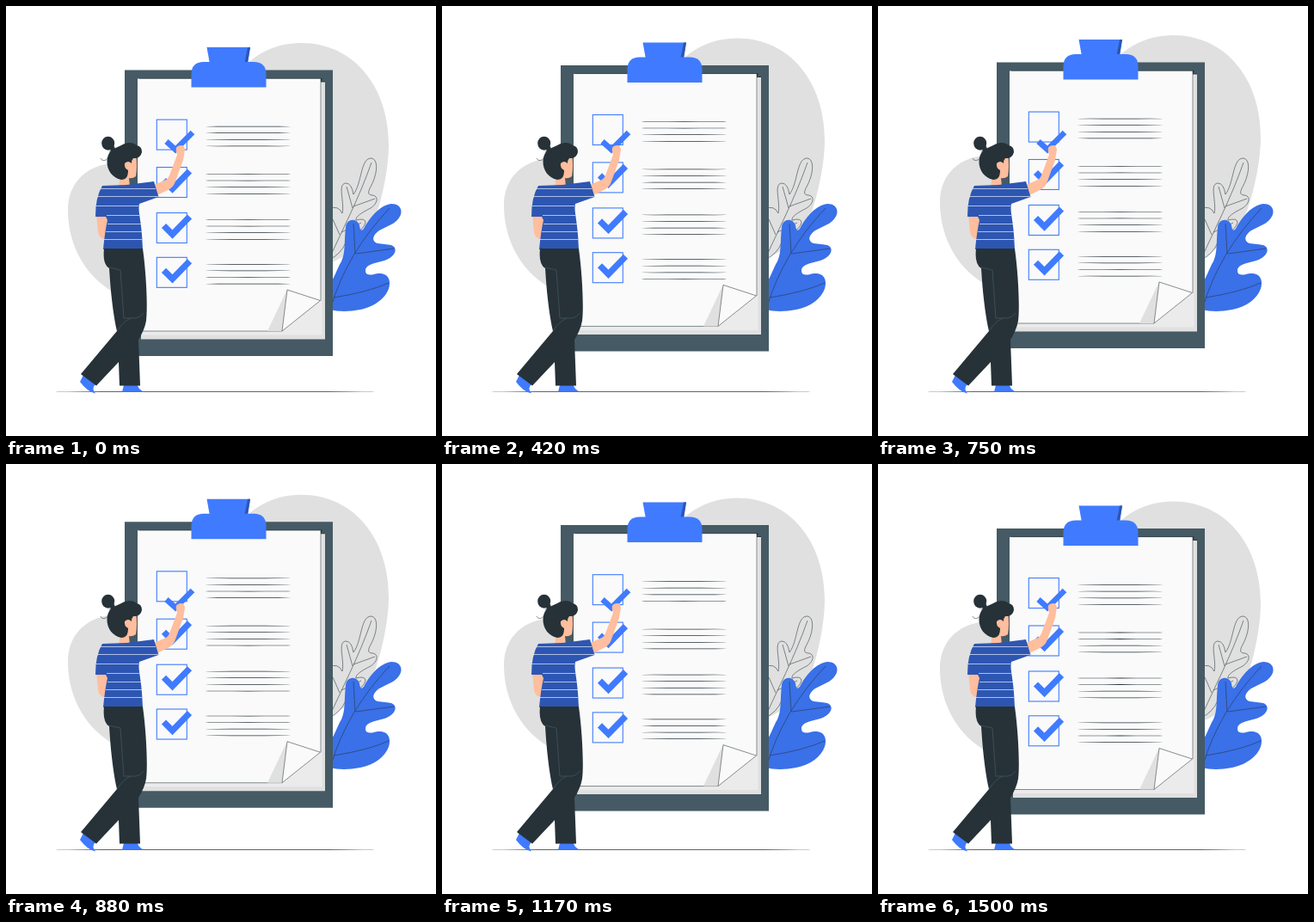
An HTML page that plays this animation: 500x500 px, repeating every 1.54 s.

```html
<!DOCTYPE html>
<html lang="en">
<head>
<meta charset="utf-8">
<title>Checklist</title>
<style>
  html, body { margin: 0; width: 100%; height: 100%; overflow: hidden; background: #fff; }
  svg { display: block; width: 100%; height: 100%; }
  .dark { fill: #263238; }
  .blue { fill: #407bff; }
  .skin { fill: #ffbe9d; }
  .thin { fill: none; stroke: #263238; stroke-width: .55; }
  .check { fill: none; stroke: #407bff; stroke-width: 7.3; }
</style>
</head>
<body>
<svg viewBox="0 0 500 500">
  <defs>
    <path id="tick" class="check" d="M9 15 19 25 39 4.500"/>
  </defs>

  <g class="float" fill="#e0e0e0">
    <path d="M270 80C285 58 312 43.500 343 43.500C405 43.500 445 95 445 162C445 188 438 222 430 245C418 275 398 292 375 300V80Z"/>
    <path d="M145 184C100 178 72 202 72 238C72 280 94 318 130 336L150 330V184Z"/>
  </g>

  <g id="plants">
    <path class="thin" style="fill:#e0e0e0" d="M376 236Q386 231 391 241C394 228 385 207 395 206Q402 206 404 219C414 206 412 178 424 177C434 177 432 197 423 212Q419 220 426 220C434 221 432 230 424 235C414 240 406 245 407 249Q418 246 418 252C415 263 402 264 395 275Q390 288 376 295Z"/>
    <path class="thin" d="M376 294C390 262 410 225 425 182M403 235 396 210M404 233 429 224M388 266 380 248M390 263 413 252"/>
    <path fill="#3a70e8" d="M376 353Q392 357 412 353C432 349 447 335 446 321C445 310 434 310 428 312Q418 314 418 308C418 300 430 299 440 296C454 291 456 281 448 278Q441 277 432 276C424 273 427 266 434 261L450 253C464 244 462 230 448 230C434 232 423 246 416 259Q412 264 411 255C408 246 396 247 395 257C393 275 395 286 390 297C385 305 383 314 376 324Z"/>
    <path class="thin" d="M378 350Q396 288 446 235M381 339Q420 333 445 322M406 288 404 253M407 288 451 282"/>
  </g>

  <g class="float">
    <path fill="#455a64" d="M138 75H380V407.500H138Z"/>
    <path fill="#e0e0e0" d="M157 88.500H371V388H157Z"/>
    <path fill="#ebebeb" d="M155 87H367.500V383H155Z"/>
    <path class="dark" d="M366 84.500H367.500V88H371V89H366Z"/>
    <path fill="#fafafa" d="M153 85H366V343L321 378.500H153Z"/>
    <path class="thin" d="M155 84.700H366V343M157 378.500H321"/>
    <path fill="#e0e0e0" d="M327 330 304 378.500H321Z"/>
    <path class="thin" style="fill:#fafafa" d="M327 330.500 365.500 343 321 378.500Z"/>
    <path class="blue" d="M233.500 48.500H284L281 68H237Z"/>
    <path fill="#2d56b3" d="M281 48.500H284L281 66H277.500Z"/>
    <path class="blue" d="M215.500 95V80Q215.500 65.500 230 65.500H288Q302.500 65.500 302.500 80V95Z"/>
    <g id="items"></g>
  </g>

  <ellipse class="dark" cx="243" cy="448.400" rx="186" ry=".45"/>

  <g id="person">
    <path class="check" style="stroke-width:6.500" d="M186.500 157.500 197 167 217 147"/>
    <path class="skin" d="M172 208 186 202Q189 200 190 197L199 173Q196 164 200 163Q207 160 208 167L206 179 197 204Q195 210 190 213L174 221Z"/>
    <path class="skin" d="M105 242H118L119 270Q109 273 107 263Z"/>
    <path class="skin" d="M136 178 151 172Q153 186 151 198Q147 201 143 200L144 210H131Z"/>
    <ellipse class="dark" cx="118.700" cy="159.700" rx="7.500" ry="8"/>
    <path class="dark" d="M121 165 126 163 128 172H122Z"/>
    <path class="thin" d="M121 168C121 180 112 182 110 177"/>
    <path class="dark" d="M117.500 180C118 168 127 165 134 162C140 158 148 158 152 162Q158 163 158 170Q156 178 148 177Q146 179 146 183Q142 179 138 183Q137 188 142 191C142 198 140 202 134 202C124 200 117 191 117.500 180Z"/>
    <path fill="#2d56b3" d="M112 209 140 208 172 204 177.500 222 155 230C153 240 158 248 159 283H113Q115 262 118 249L116 245H104Q104 222 112 209Z"/>
    <path fill="none" stroke="#e8eefc" stroke-width=".7" d="M110 212.500H174M106 221.500H177M105 232.500H154M117 243.500H155M118 253.500H157M116 262.500H158M114 271.500H158"/>
    <path class="blue" d="M90 429 104 440Q99 444 104 450.500Q95 449 86 437Z"/>
    <path class="blue" d="M137 441H153Q154 446 160 448.500H135Z"/>
    <path class="dark" d="M114 282H159C163 310 165 350 163 366Q161 377 154 388L156 441.500H132L131 414 105 441.500 87 428 129 378C123 350 121 320 120 305Q112 300 114 282Z"/>
    <path fill="none" stroke="#455a64" stroke-width=".7" d="M120 304 133 307 137 363H151Q157 362 160 357M145 363Q137 366 129 378"/>
  </g>
</svg>
<script>
  const LOOP = 1540, CYCLE = 1500, LEAD = 35, LIFT = 10;

  // Each row: a box with its tick and four tapered lines of writing.
  const row = (y, ticked) => {
    const lines = [8, 15.5, 23.2, 30.8].map(dy =>
      `<ellipse class="dark" cx="281.500" cy="${y + dy}" rx="50" ry=".38"/>`).join("");
    return `<rect x="175.300" y="${y}" width="35" height="35" fill="none" stroke="#407bff" stroke-width="1.100"/>` +
      lines + (ticked ? `<use href="#tick" x="174.500" y="${y}"/>` : "");
  };
  document.getElementById("items").innerHTML =
    [132.6, 188, 241, 292.8].map((y, i) => row(y, i > 0)).join("");

  const floating = document.querySelectorAll(".float");
  const start = performance.now();

  function draw() {
    const t = (performance.now() - start) % LOOP;
    const phase = Math.min(1, (t + LEAD) / CYCLE);
    const lift = LIFT * (1 - Math.abs(1 - 2 * phase));
    floating.forEach(g => g.setAttribute("transform", `translate(0 ${-lift})`));
    requestAnimationFrame(draw);
  }
  draw();
</script>
</body>
</html>
```
